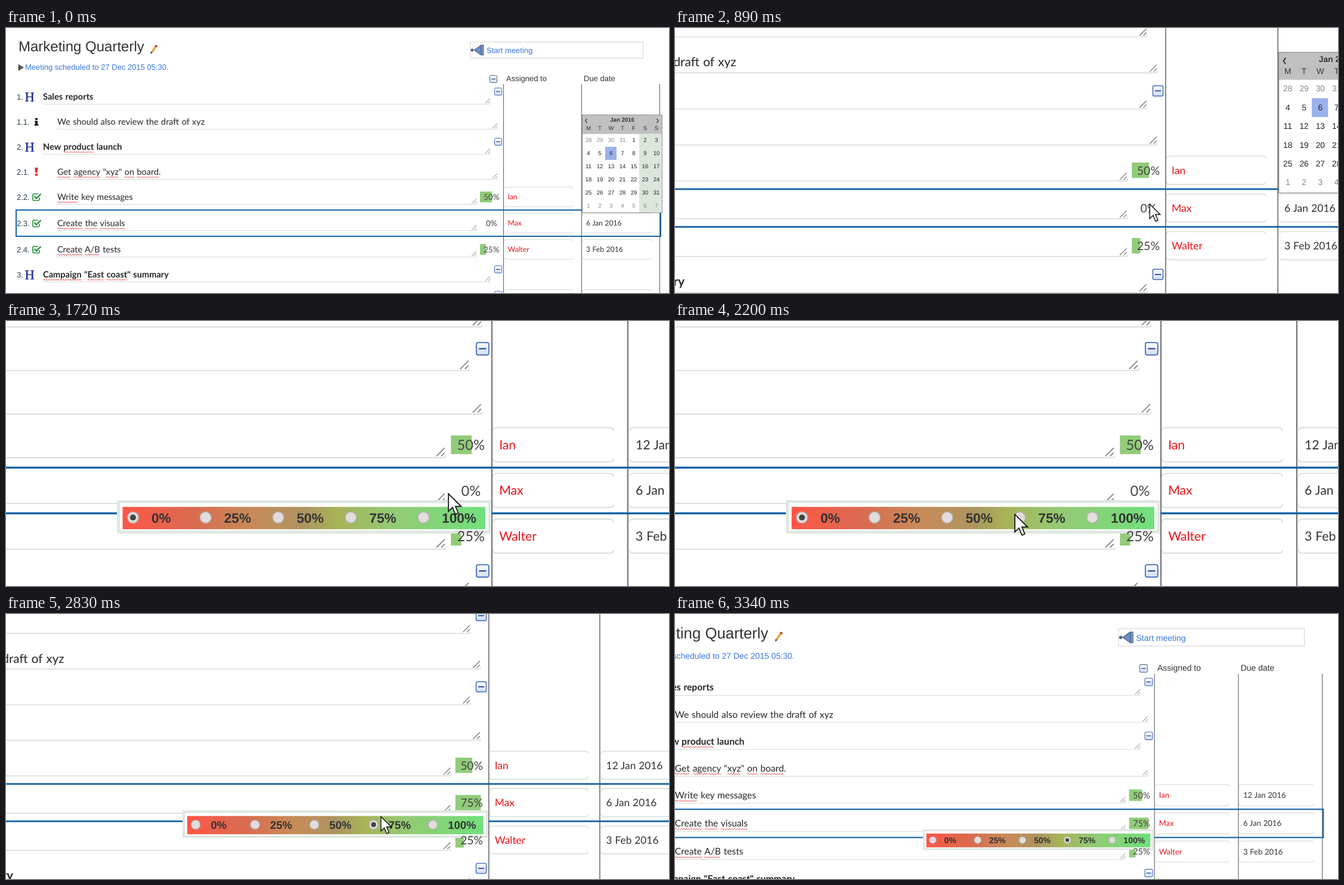
Animation of 1112 by 444 pixels, one loop 3740 ms. Source, as an HTML page:

```html
<!DOCTYPE html>
<html lang="en">
<head>
<meta charset="utf-8">
<title>Meeting agenda</title>
<style>
html, body { margin: 0; width: 100%; height: 100%; overflow: hidden; background: #fff; }
svg { display: block; width: 1112px; height: 444px; }
text { font: 13px "Liberation Sans", Arial, sans-serif; fill: #333; text-rendering: geometricPrecision; white-space: pre; }
.row { font: 14.45px Lato, sans-serif; word-spacing: .8px; fill: #262626; }
.head { font-size: 14.6px; font-weight: 700; }
.cell { font: 12.2px Lato, sans-serif; word-spacing: .3px; }
.name { fill: #ee1118; }
.pct { font: 13.6px Lato, sans-serif; text-anchor: middle; fill: #444; }
.num { fill: #2b3f4c; }
.link { fill: #3876e2; }
.cal { font-size: 9.6px; text-anchor: middle; }
.opt { font-weight: 700; }
</style>
</head>
<body>
<svg id="stage" viewBox="0 0 1112 444" xmlns="http://www.w3.org/2000/svg">
  <defs>
    <linearGradient id="scale">
      <stop offset="0" stop-color="#ff5547"/>
      <stop offset=".2" stop-color="#d86c50"/>
      <stop offset=".35" stop-color="#c98a58"/>
      <stop offset=".5" stop-color="#ad9460"/>
      <stop offset=".59" stop-color="#a8b258"/>
      <stop offset=".74" stop-color="#93ca74"/>
      <stop offset="1" stop-color="#70e07c"/>
    </linearGradient>
    <linearGradient id="btn" x2="0" y2="1">
      <stop offset="0" stop-color="#fff"/>
      <stop offset="1" stop-color="#cfdcf3"/>
    </linearGradient>
    <clipPath id="reveal"><rect id="hole"/></clipPath>
  </defs>
  <g id="page"></g>
  <g id="calendar"></g>
  <g id="popup" clip-path="url(#reveal)"></g>
  <g id="values"></g>
  <g id="mouse">
    <path id="arrow" d="M0 0V17L4 13.2L6.8 20L9.6 18.8L6.8 12.2H12.2Z" fill="#fff" stroke="#111"/>
    <path id="hand" d="M-1.5 0Q0-2 1.5 0V7Q3 5.5 4.5 7.3Q6 6.2 7.5 8Q9.5 7 10.5 9.5V14L8.5 20.5H-.5L-5 13Q-6 9.5-3.5 10.2L-1.5 12.5ZM1.5 7V10.5M4.5 7.5V11M7.5 8.2V11" fill="#fff" stroke="#222"/>
    <path id="beam" d="M-3-7.5H-1L0-6.8L1-7.5H3M-3 7.5H-1L0 6.8L1 7.5H3M0-7V7" fill="none" stroke="#222" stroke-width="1.1"/>
  </g>
</svg>
<script>
const $ = id => document.getElementById(id);
const LOOP = 3740, END = 3340;
const LINE = '#d6dbd7', GREEN = '#92cc79';

const rect = (x, y, w, h, attrs) => `<rect x="${x}" y="${y}" width="${w}" height="${h}" ${attrs}/>`;
const path = (d, stroke, attrs = '') => `<path d="${d}" fill="none" stroke="${stroke}" ${attrs}/>`;
const text = (x, y, s, cls = '', attrs = '') => `<text x="${x}" y="${y}" class="${cls}" ${attrs}>${s}</text>`;

const minus = (x, y, color = '#3f68bd') =>
  rect(x - 6, y - 6, 12, 12, `rx="1.8" fill="url(#btn)" stroke="${color}"`) +
  path(`M${x - 3.5} ${y}h7`, '#2d4f9c', 'stroke-width="1.3"');

// Text area: bottom edge plus resize grip.
const area = (x, end, y) =>
  path(`M${x - 1} ${y - 2}q0 2 2 2H${end - 2}q2 0 2-2`, LINE) +
  path(`M${end - 9} ${y - 1.5}l8-8M${end - 4.5} ${y - 1.5}l3.5-3.5`, '#777', 'stroke-width=".9"');

const field = (x, y, w) =>
  path(`M${x} ${y + 3}q0-3 4-3h${w - 8}q4 0 4 3M${x} ${y + 30}q0 3 4 3h${w - 8}q4 0 4-3`, LINE);

const icons = {
  H: y => text(31.5, y + 8, 'H', '', 'style="font:22.5px \'Liberation Serif\',serif;fill:#1c2c96;stroke:#1c2c96;stroke-width:.4"'),
  i: y => `<path d="M49 ${y - 6}h4v3h-4zM48 ${y - 1.5}h5v6h1.5v2h-7v-2h1.5v-4h-1z" fill="#111"/>`,
  '!': y => `<path d="M48.6 ${y - 7}h4.8l-.9 8.5h-3zM49 ${y + 3}h4v3.6h-4z" fill="#f0101c"/>`,
  v: y => path(`M56 ${y + 1}v3q0 2-2 2h-7q-2 0-2-2v-7q0-2 2-2h7`, '#259436', 'stroke-width="1.6"') +
    path(`M47.5 ${y - 1}l3.5 3.5l7.5-7.5`, '#259436', 'stroke-width="2.4"')
};

// number, icon, centre y, label with misspelt words in underscores, progress, person, date
const rows = [
  ['1.', 'H', 115, 'Sales reports'],
  ['1.1.', 'i', 157, 'We should also review the draft of xyz'],
  ['2.', 'H', 199, 'New _product_ launch'],
  ['2.1.', '!', 241, '_Get_ _agency_ "_xyz_" _on_ _board_.'],
  ['2.2.', 'v', 283, '_Write_ key messages', 50, 'Ian', '12 Jan 2016'],
  ['2.3.', 'v', 327, '_Create_ _the_ _visuals_', 0, 'Max', '6 Jan 2016'],
  ['2.4.', 'v', 371, '_Create_ _A/B_ tests', 25, 'Walter', '3 Feb 2016'],
  ['3.', 'H', 413, '_Campaign_ "_East_ _coast_" summary']
];

function drawRow([num, icon, y, label, pct, who, due]) {
  const head = icon === 'H', task = icon === 'v';
  const x = head ? 62 : 86;
  let s = text(18, y + 5, num, 'num') + icons[icon](y);
  s += text(x, y + 5, label.replace(/_/g, ''), head ? 'row head' : 'row', `data-label='${label}'`);
  s += area(x, head ? 813 : task ? 790 : 825, y + 12.5);
  if (head) s += minus(825.5, y - 8.5);
  if (task) {
    s += rect(795, y - 9, pct * .4, 18, `fill="${GREEN}"${pct ? '' : ' id="bar"'}`);
    s += field(835.5, y - 16.5, 116) + field(967, y - 16.5, 116);
    s += text(841.5, y + 4.3, who, 'cell name') + text(973, y + 4.3, due, 'cell');
  }
  return s;
}

// Percentages stay readable above the popup.
const drawValue = ([, , y, , pct]) =>
  text(814.3, y + 5, pct + '%', 'pct', pct ? '' : 'id="value"');

function drawPage() {
  let s = text(21, 39, 'Marketing Quarterly', '', 'style="font-size:24px"');
  s += path('M244.5 40.5L252 30', '#e8a33a', 'stroke-width="3.4"') +
    path('M251 31.5L252.8 29', '#c03a2a', 'stroke-width="3.8"') +
    '<path d="M242.3 43.5l.7-4.2l3 2.1z" fill="#443"/>';
  s += '<path d="M20.5 60.5v11.5l9.5-5.75z" fill="#555"/>';
  s += text(32, 70, 'Meeting scheduled to 27 Dec 2015 05:30.', 'link');
  s += rect(778.5, 23.5, 290, 27, 'fill="none" stroke="#d8d2d7"');
  s += '<path d="M785 37L797 28.5V45.5Z" fill="#6d8fc4" stroke="#36507f"/>' +
    rect(798, 28.5, 3, 17, 'fill="#7f9fd0" stroke="#36507f" stroke-width=".8"') +
    '<circle cx="781.8" cy="37" r="2.5" fill="#4b6492"/>';
  s += text(806, 42, 'Start meeting', 'link');
  s += minus(817.5, 85.5, '#58657d');
  s += text(839, 89, 'Assigned to') + text(969, 89, 'Due date');
  s += path('M834.5 94V470M965.5 94V470M1096.5 94V470', '#5a5a5a');
  s += rows.map(drawRow).join('');
  s += field(835.5, 438.5, 116) + field(967, 438.5, 116) + minus(825.5, 447);
  s += rect(17, 305, 1081, 44, 'fill="none" stroke="#1765a6" stroke-width="2"');
  $('page').innerHTML = s;
  $('values').innerHTML = rows.filter(r => r[1] === 'v').map(drawValue).join('');
}

// Wavy underlines below the marked words.
function drawWaves() {
  let s = '';
  for (const el of document.querySelectorAll('[data-label]')) {
    let pos = 0;
    const y = +el.getAttribute('y') + 4;
    el.dataset.label.split('_').forEach((part, i) => {
      if (i % 2) {
        const x0 = el.getStartPositionOfChar(pos).x;
        const x1 = el.getEndPositionOfChar(pos + part.length - 1).x;
        let d = `M${x0} ${y}`;
        for (let x = x0 + 2, k = 1; x <= x1; x += 2, k++) d += `L${x} ${y + (k % 2 ? -1 : 1)}`;
        s += path(d, '#e8383c', 'stroke-width=".9"');
      }
      pos += part.length;
    });
  }
  $('page').insertAdjacentHTML('beforeend', s);
}

function drawCalendar() {
  const col = i => 977 + 19 * i;
  let s = rect(966.5, 145.5, 134, 164, 'fill="#fff"') +
    rect(966.5, 145.5, 134, 32, 'fill="#c0c0c0"') +
    rect(1062, 177, 38.5, 132, 'fill="#dde6dd"') +
    rect(1005, 199, 19, 22, 'fill="#9bb1ec"') +
    rect(966.5, 145.5, 134, 164, 'fill="none" stroke="#9a9a9a"');
  s += text(1033.5, 157, 'Jan 2016', 'cal', 'style="font-weight:700"');
  s += path('M974.5 152l-2.5 3.5l2.5 3.5M1091.5 152l2.5 3.5l-2.5 3.5', '#222', 'stroke-width="1.2"');
  [...'MTWTFSS'].forEach((d, i) => s += text(col(i), 171, d, 'cal'));
  for (let k = 0; k < 42; k++) {
    const day = new Date(Date.UTC(2015, 11, 28 + k));
    const fill = day.getUTCMonth() === 0 ? '#222' : '#888';
    s += text(col(k % 7), 191 + 21.9 * Math.floor(k / 7), day.getUTCDate(), 'cal', `style="fill:${fill}"`);
  }
  $('calendar').innerHTML = s;
}

const radioX = i => 488.5 + 70 * i;

function drawPopup() {
  let s = rect(474.5, 337.7, 358, 29.4, 'fill="#fff" stroke="#dfe8e0" stroke-width="3"') +
    rect(478.5, 342.8, 349.6, 21.5, 'fill="url(#scale)"');
  for (let i = 0; i < 5; i++) {
    s += `<circle cx="${radioX(i)}" cy="353" r="5.4" fill="#e2dcdc" stroke="#b5aeae" stroke-width=".9"/>`;
    s += text(radioX(i) + 17.8, 358, i * 25 + '%', 'opt');
  }
  s += '<circle id="dot" cy="353" r="2.9" fill="#444"/>';
  $('popup').innerHTML = s;
}

const clamp = u => Math.min(1, Math.max(0, u));
const span = (t, a, b) => clamp((t - a) / (b - a));
const quad = u => u < .5 ? 2 * u * u : 1 - 2 * (1 - u) ** 2;
const smooth = u => u * u * (3 - 2 * u);
const mix = (a, b, u) => a.map((v, i) => v + (b[i] - v) * u);

// Camera views: left, top, width.
const wide = [0, 0, 1112], close = [366.1, 163.8, 639.1], rest = [86.1, .5, 1034.9];

const OPEN = [1130, 1340], CLICK = 2430, CAL_OFF = 1010;

// time, x, y of the pointer
const track = [
  [330, 900, 266], [590, 835, 310], [1040, 809.3, 326.7], [1570, 809.3, 326.7],
  [2200, 693.7, 350], [2400, 697.6, 351.5], [2680, 697.6, 351.5],
  [3040, 722.7, 330.4], [3320, 738, 320]
];

function pointer(t) {
  let i = 0;
  while (i < track.length - 2 && t >= track[i + 1][0]) i++;
  const [a, b] = [track[i], track[i + 1]];
  return mix(a.slice(1), b.slice(1), smooth(span(t, a[0], b[0])));
}

const show = (id, on) => $(id).style.display = on ? '' : 'none';

function render(t) {
  t = Math.min(t, END);
  const view = t < 2000
    ? mix(wide, close, quad(span(t, 175, 1325)))
    : mix(close, rest, quad(span(t, 2450, 3345)));
  $('stage').setAttribute('viewBox', `${view[0]} ${view[1]} ${view[2]} ${view[2] * 444 / 1112}`);

  show('calendar', t < CAL_OFF);

  const p = span(t, ...OPEN);
  show('popup', p > 0);
  const hole = { x: 653.4 - 181 * p, y: 352.4 - 16.5 * p, width: 362 * p, height: 33 * p };
  for (const k in hole) $('hole').setAttribute(k, hole[k]);

  const picked = t >= CLICK ? 3 : 0;
  $('dot').setAttribute('cx', radioX(picked));
  $('bar').setAttribute('width', picked * 10);
  $('value').textContent = picked * 25 + '%';

  const [x, y] = pointer(t);
  show('mouse', t >= track[0][0] && t < 3320);
  $('mouse').setAttribute('transform', `translate(${x} ${y})`);
  const hand = t >= 960 && t < 1650;
  const beam = t > 2680 && y < 337;
  show('hand', hand);
  show('beam', beam);
  show('arrow', !hand && !beam);
}

drawPage();
drawWaves();
drawCalendar();
drawPopup();

const start = performance.now();
function tick() {
  render((performance.now() - start) % LOOP);
  requestAnimationFrame(tick);
}
render(0);
requestAnimationFrame(tick);
</script>
</body>
</html>
```
